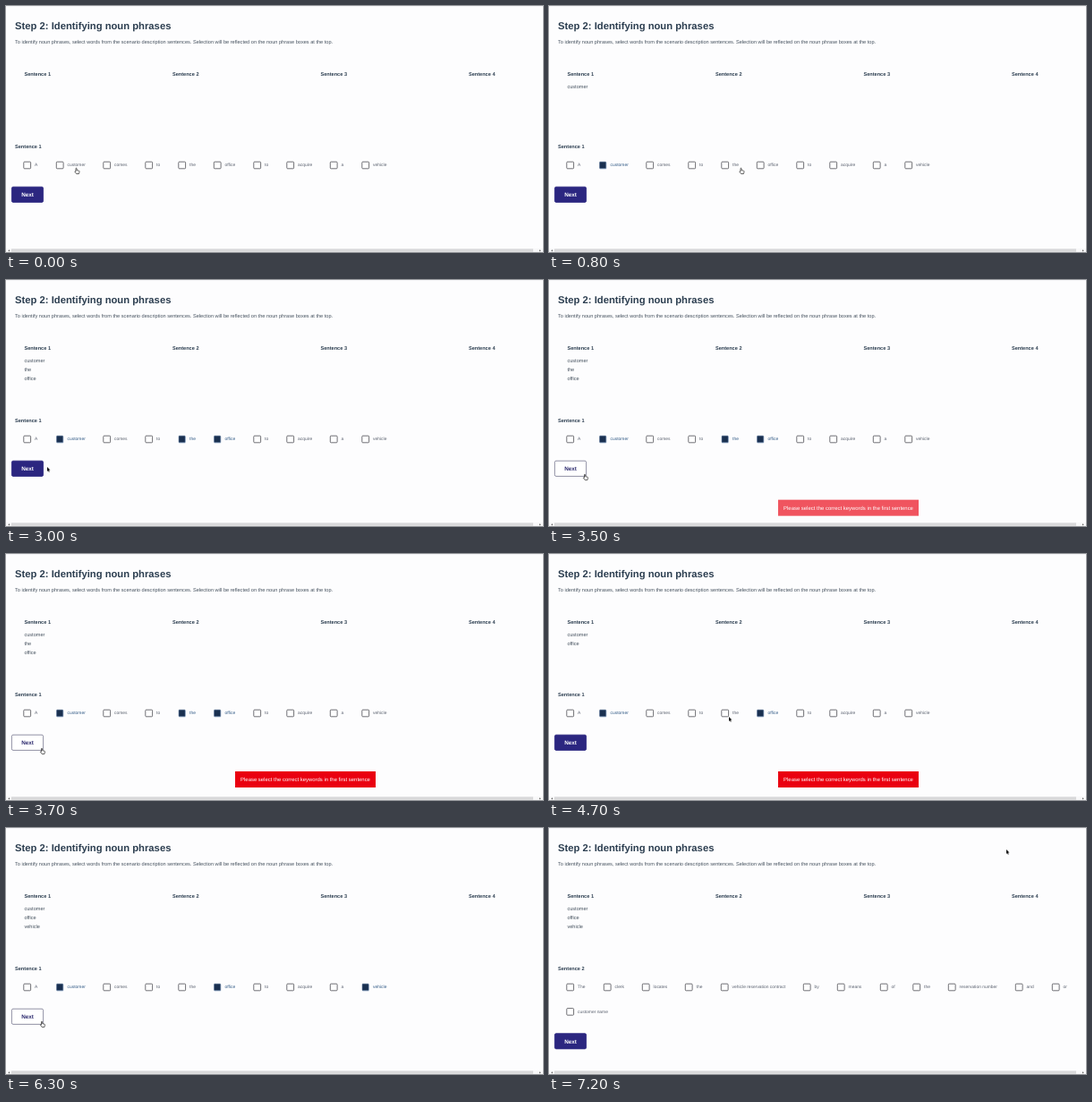
An HTML page for the animation above (7300 ms loop, 600 px wide and 275 px high).

```html
<!DOCTYPE html>
<html lang="en">
<head>
<meta charset="utf-8">
<title>Identifying noun phrases</title>
<style>
html, body { margin: 0; height: 100%; overflow: hidden; background: #fdfdfe; }
svg { display: block; width: 100vw; height: 100vh; }
text { font: 5.62px "Liberation Sans", Arial, sans-serif; fill: #46525f; text-rendering: geometricPrecision; }
.h1 { font-size: 11.25px; font-weight: bold; fill: #2c3e50; }
.bold { font-weight: bold; fill: #2c3e50; }
.word { font-size: 4.92px; fill: #5b6270; }
.on { fill: #315a86; }
.next { font-size: 6.33px; font-weight: bold; text-anchor: middle; fill: #fff; }
.next.hover { fill: #2c2a6e; }
.toast { font-size: 5.95px; text-anchor: middle; fill: #fff; }
</style>
</head>
<body>
<svg id="stage" viewBox="0 0 600 275"></svg>
<script>
const LOOP = 7300, STEP = 100, SUBMIT = 6400;
const stage = document.getElementById('stage');

// [checkbox centre, label, time on, time off]
const page1 = [
  [23.5, 'A'], [60, 'customer', 200], [112.5, 'comes'], [159.5, 'to'], [196.5, 'the', 1000, 4500],
  [236, 'office', 2600], [280.5, 'to'], [317.5, 'acquire'], [366, 'a'], [401.5, 'vehicle', 5500]
];
const page2 = [
  [23.5, 'The'], [65, 'clerk'], [108, 'locates'], [156, 'the'], [196, 'vehicle reservation contract'],
  [288, 'by'], [326, 'means'], [374, 'of'], [410.5, 'the'], [450, 'reservation number'],
  [525, 'and'], [566, 'or']
];

// [time, x, y, hand until the next stop]
const stops = [
  [0, 77, 181, 1], [300, 77, 181], [800, 213, 181, 1], [2000, 213, 181], [2300, 249, 181, 1],
  [2600, 249, 181], [3000, 46, 209], [3200, 38.5, 217, 1], [4000, 38.5, 217], [4100, 90, 205],
  [4300, 201, 182], [4700, 201, 182], [5200, 417, 181, 1], [5500, 417, 181], [5900, 55, 198],
  [6100, 38.5, 216, 1], [SUBMIT, 38.5, 216], [7000, 500, 34], [7100, 511, 24], [LOOP, 511, 24]
];

const clamp = v => Math.max(0, Math.min(1, v));
const isOn = ([, , on, off = Infinity], t) => t >= on && t < off;
const text = (x, y, s, cls = '') => `<text x="${x}" y="${y}" class="${cls}">${s}</text>`;
const rect = (x, y, w, h, fill, more = '') =>
  `<rect x="${x}" y="${y}" width="${w}" height="${h}" fill="${fill}" ${more}/>`;

function choice(x, y, label, on) {
  const box = on
    ? rect(x - 3.6, y - 3.4, 8, 8, '#c5d3e4', 'rx="1"') + rect(x - 3.4, y - 3.6, 7, 7.4, '#1a3050', 'stroke="#49648a" stroke-width=".5" rx=".6"')
    : rect(x - 3.7, y - 3.6, 7.8, 7.6, '#fff', 'stroke="#55555b" stroke-width=".85" rx=".9"');
  return box + text(x + 8.6, y + 1.5, label, on ? 'word on' : 'word');
}

function button(y, hover) {
  const look = hover ? ['#fff', '#77778f'] : ['#2b2680', '#2b2680'];
  return rect(6.4, y + .4, 35.2, 17.2, look[0], `stroke="${look[1]}" stroke-width=".8" rx="1.6"`) +
    text(24, y + 11.2, 'Next', hover ? 'next hover' : 'next');
}

function toast(t) {
  const show = t < 5000 ? clamp((t - 3300) / 300) : clamp((6100 - t) / 300 + .08);
  if (!show) return '';
  return `<g opacity="${show}" transform="translate(0 ${8 * (1 - show)})">` +
    rect(256, 243, 157, 18, '#ea0010') +
    text(334.5, 254, 'Please select the correct keywords in the first sentence', 'toast') + '</g>';
}

function pointer(t) {
  const i = stops.findIndex(s => s[0] > t);
  const [t0, x0, y0, hand] = stops[i - 1], [t1, x1, y1] = stops[i];
  const k = (t - t0) / (t1 - t0);
  return { x: x0 + (x1 - x0) * k, y: y0 + (y1 - y0) * k, hand };
}

function cursor({ x, y, hand }) {
  const shape = hand
    ? '<path d="M1 .5Q1.6-.1 2.1.6V2.6L4.5 3.2Q5.2 3.5 5 4.5L4.4 6.6H1.7L-.1 4.2Q0 3.4 1 4Z" fill="#fff" stroke="#222" stroke-width=".7"/>'
    : '<path d="M0 0V4.9L1.1 3.9 1.9 5.7 2.7 5.3 1.9 3.6H3.5Z" fill="#111"/>';
  return `<g transform="translate(${x} ${y})">${shape}</g>`;
}

const header = rect(0, 0, 600, .7, '#f2f2f5') +
  text(10, 26.2, 'Step 2: Identifying noun phrases', 'h1') +
  text(10, 41.8, 'To identify noun phrases, select words from the scenario description sentences. Selection will be reflected on the noun phrase boxes at the top.') +
  [0, 1, 2, 3].map(i => text(20.4 + 165.5 * i, 78.4, 'Sentence ' + (i + 1), 'bold')).join('');

const scrollbar = rect(0, 271, 600, 4, '#f8f8f9') + rect(6, 271.5, 583, 3.2, '#d8d8d9') +
  '<path d="M4 272.2V274.6L2.4 273.4ZM596 272.2V274.6L597.6 273.4Z" fill="#555"/>';

function render(t) {
  const mouse = pointer(t), second = t >= SUBMIT;
  const list = page1.filter(w => isOn(w, t)).map((w, i) => text(20.4, 92 + 10 * i, w[1]));
  const words = (second ? page2 : page1).map(w => choice(w[0], 177.8, w[1], isOn(w, t)));
  if (second) words.push(choice(23.5, 205.2, 'customer name'));
  stage.innerHTML = header + list.join('') +
    text(10, 159, 'Sentence ' + (second ? 2 : 1), 'bold') + words.join('') +
    button(second ? 229.3 : 201.8, mouse.hand && mouse.y > 200) +
    scrollbar + toast(t) + cursor(mouse);
}

let last = -1;
function tick() {
  const t = Math.floor(performance.now() % LOOP / STEP) * STEP;
  if (t !== last) render(last = t);
  requestAnimationFrame(tick);
}
tick();
</script>
</body>
</html>
```
